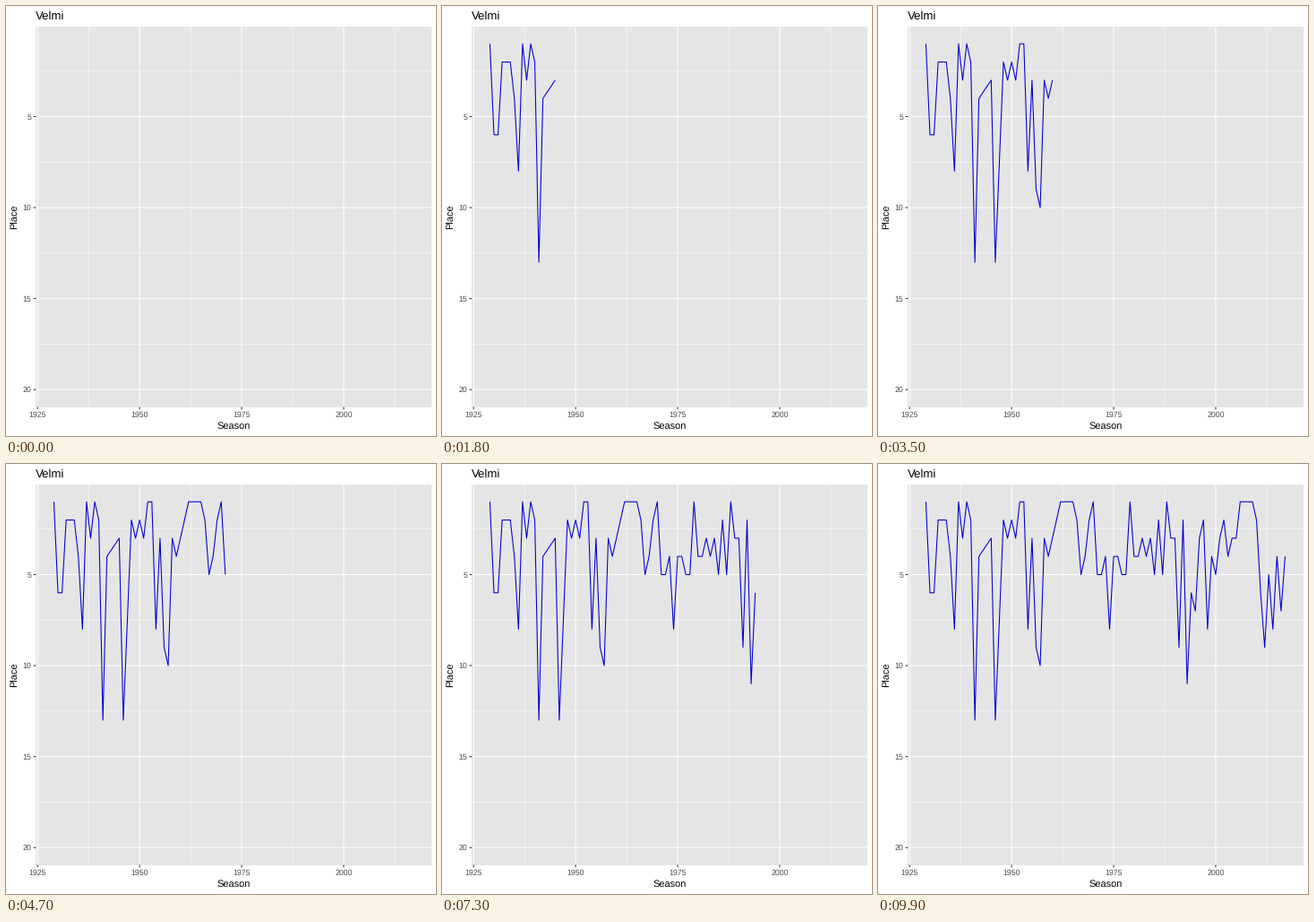
Recreate the animation shown at these times as a matplotlib script. Size 480x480 px, loop 10 s.

```python
import numpy as np
import matplotlib.pyplot as plt
from matplotlib.animation import FuncAnimation
from matplotlib.patches import Rectangle

SIZE, DPI = 480, 96
FRAMES, INTERVAL = 100, 100
PT = 72 / DPI  # points per pixel
LEFT, RIGHT, TOP, BOTTOM = 33.4, 474.5, 22.9, 447.5
FIRST, LAST = 1929, 2017

plt.rcParams["font.family"] = "Liberation Sans"
plt.rcParams["text.hinting"] = "none"

gaps = (1943, 1944, 1947)
years = np.array([y for y in range(FIRST, LAST + 1) if y not in gaps])
places = np.array([
    1, 6, 6, 2, 2, 2, 4, 8, 1, 3, 1,
    2, 13, 4, 3, 13, 2, 3,
    2, 3, 1, 1, 8, 3, 9, 10, 3, 4,
    3, 2, 1, 1, 1, 1, 2, 5, 4, 2,
    1, 5, 5, 4, 8, 4, 4, 5, 5, 1,
    4, 4, 3, 4, 3, 5, 2, 5, 1, 3,
    3, 9, 2, 11, 6, 7, 3, 2, 8, 4,
    5, 3, 2, 4, 3, 3, 1, 1, 1, 1,
    2, 6, 9, 5, 8, 4, 7, 4,
])


def to_x(year):
    return LEFT + (year - 1924.6) / 96.8 * (RIGHT - LEFT)


def to_y(place):
    return TOP + (place - 0.05) / 20.9 * (BOTTOM - TOP)


fig = plt.figure(figsize=(SIZE / DPI, SIZE / DPI), dpi=DPI, facecolor="white")
ax = fig.add_axes([0, 0, 1, 1])
ax.set(xlim=(0, SIZE), ylim=(SIZE, 0))
ax.axis("off")


def stroke(xs, ys, color, width=1.07, z=2):
    line, = ax.plot(xs, ys, color=color, lw=width * PT, zorder=z, snap=False,
                    solid_capstyle="butt", solid_joinstyle="round")
    return line


def label(x, y, text, size, color="black", ha="center", rotation=0):
    ax.text(x, y, text, fontsize=size * PT, color=color, ha=ha, va="baseline",
            rotation=rotation, rotation_mode="anchor")


ax.add_patch(Rectangle((LEFT, TOP), RIGHT - LEFT, BOTTOM - TOP,
                       fc="#e5e5e5", lw=0, zorder=1))

for place in np.arange(2.5, 20, 5):
    stroke([LEFT, RIGHT], [to_y(place)] * 2, "white", 0.53)
for year in np.arange(1937.5, 2020, 25):
    stroke([to_x(year)] * 2, [TOP, BOTTOM], "white", 0.53)

for place in range(5, 21, 5):
    y = to_y(place)
    stroke([LEFT, RIGHT], [y, y], "white")
    stroke([LEFT - 2.75, LEFT], [y, y], "#333333")
    label(LEFT - 4.95, y + 3.2, str(place), 8.8, "#4d4d4d", ha="right")
for year in range(1925, 2001, 25):
    x = to_x(year)
    stroke([x, x], [TOP, BOTTOM], "white")
    stroke([x, x], [BOTTOM, BOTTOM + 2.75], "#333333")
    label(x, 458.8, str(year), 8.8, "#4d4d4d")

label(LEFT, 15, "Velmi", 13.2, ha="left")
label((LEFT + RIGHT) / 2, 472.2, "Season", 11)
label(13.4, (TOP + BOTTOM) / 2, "Place", 11, rotation=90)

curve = stroke([], [], "#0000cd", z=3)

# Each season is reached on a whole frame; the tip is interpolated in between.
arrival = np.round((years - FIRST) * (FRAMES - 1) / (LAST - FIRST))


def update(frame):
    done = arrival <= frame
    xs = np.append(years[done], np.interp(frame, arrival, years))
    ys = np.append(places[done], np.interp(frame, arrival, places))
    if frame == 0:
        xs, ys = xs[:0], ys[:0]
    curve.set_data(to_x(xs), to_y(ys))
    return curve,


anim = FuncAnimation(fig, update, frames=FRAMES, interval=INTERVAL,
                     repeat=True, repeat_delay=0)
plt.show()
```
